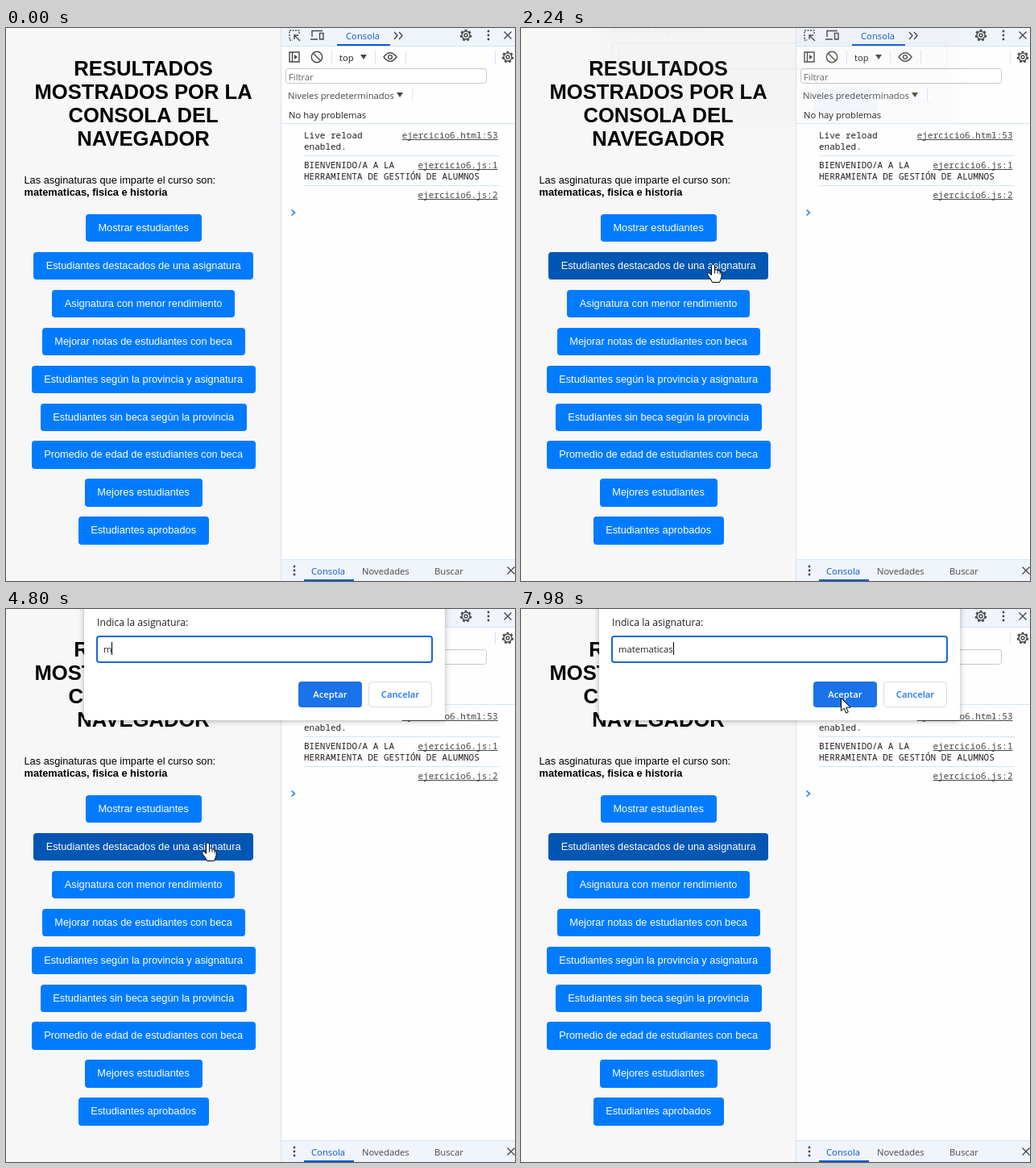
An HTML page with a canvas that plays this animation: 632 px wide and 686 px high, repeating every 8000 ms.

```html
<!DOCTYPE html>
<html lang="es">
<head>
<meta charset="utf-8">
<title>Consola</title>
<style>
html, body { margin: 0; width: 100%; height: 100%; overflow: hidden; background: #fff; }
canvas { display: block; }
</style>
</head>
<body>
<canvas id="stage" width="632" height="686"></canvas>
<script>
const c = document.getElementById('stage').getContext('2d');
const LOOP = 8000;
const SANS = '"Liberation Sans", Arial, sans-serif';
const UI = '"Open Sans", "Noto Sans", sans-serif';
const MONO = '11px "Noto Sans Mono", "DejaVu Sans Mono", monospace';
const BLUE = '#0b57d0', INK = '#1f1f1f', ICON = '#474747', RULE = '#d3e3fd', BAR = '#f0f4fb';

const BUTTONS = [
  'Mostrar estudiantes', 'Estudiantes destacados de una asignatura',
  'Asignatura con menor rendimiento', 'Mejorar notas de estudiantes con beca',
  'Estudiantes según la provincia y asignatura', 'Estudiantes sin beca según la provincia',
  'Promedio de edad de estudiantes con beca', 'Mejores estudiantes', 'Estudiantes aprobados'
];
const WORD = 'matematicas';
const KEY_TIMES = [4800, 4890, 5130, 5180, 5490, 5570, 5710, 5920, 6000, 6090, 6170];
const CARET_TOGGLES = [2710, 3230, 3760, 4390, 6730, 7260];
const HOVER_START = 1370, DIALOG_START = 2240;

// Pointer path: time, x, y
const PATH = [
  [260, 594, 680], [480, 530, 575], [700, 430, 425], [900, 356, 338], [1060, 326, 310],
  [1160, 326, 310], [1370, 307, 303], [1500, 251, 293], [1600, 241, 292], [1690, 238, 292],
  [2710, 238, 292], [2790, 238, 290], [3760, 238, 290], [3990, 250, 289],
  [6880, 250, 289], [7130, 452, 228], [7250, 474, 200], [7450, 446, 162], [7680, 411, 134],
  [7850, 401, 117], [7980, 397, 110]
];

const HAND = new Path2D('M-2 2Q0 -1 2 2V8Q4 6 5.5 8.5Q8 7.5 8.5 10Q10.5 9.5 10.5 12V16Q10 19 8 23H-1Q-2 20 -6 15Q-8 12 -6 11Q-4.5 11 -2 14Z');
const FINGERS = new Path2D('M2 8V12M5.5 9V12M8.5 10.5V13');
const ARROW = new Path2D('M0 0V16L3.7 12.6L6.2 18.5L8.8 17.4L6.3 11.6H11.5Z');
const IBEAM = new Path2D('M-3.5 -7.5H-1L0 -6.5L1 -7.5H3.5M0 -6.5V6.5M-3.5 7.5H-1L0 6.5L1 7.5H3.5');

const clamp = v => Math.max(0, Math.min(1, v));

function text(str, x, y, font, color = INK, align = 'left') {
  c.font = font;
  c.fillStyle = color;
  c.textAlign = align;
  c.fillText(str, x, y);
}
const ui = (str, x, y, color) => text(str, x, y, '11.25px ' + UI, color);

function rect(x, y, w, h, color) {
  c.fillStyle = color;
  c.fillRect(x, y, w, h);
}

function box(x, y, w, h, r, fill, stroke, lineWidth = 1) {
  c.beginPath();
  c.roundRect(x, y, w, h, r);
  if (fill) { c.fillStyle = fill; c.fill(); }
  if (stroke) { c.strokeStyle = stroke; c.lineWidth = lineWidth; c.stroke(); }
}

function line(d, color = ICON, width = 1.4) {
  c.strokeStyle = color;
  c.lineWidth = width;
  c.stroke(new Path2D(d));
}

function fill(d, color = ICON) {
  c.fillStyle = color;
  c.fill(new Path2D(d));
}

function ring(x, y, r, width = 1.4) {
  c.strokeStyle = ICON;
  c.lineWidth = width;
  c.beginPath();
  c.arc(x, y, r, 0, 2 * Math.PI);
  c.stroke();
}

function gear(x, y) {
  c.setLineDash([2.8, 2.8 * 0.964]);
  ring(x, y, 6.3, 2);
  c.setLineDash([]);
  ring(x, y, 5);
  ring(x, y, 2);
}

function kebab(x, y) {
  for (const dy of [-5, 0, 5]) {
    c.fillStyle = ICON;
    c.beginPath();
    c.arc(x, y + dy, 1.4, 0, 2 * Math.PI);
    c.fill();
  }
}

const cross = (x, y) => line(`M${x - 4.5} ${y - 4.5}l9 9m0 -9l-9 9`);

function link(str, y) {
  text(str, 610.5, y, MONO, ICON, 'right');
  const w = c.measureText(str).width;
  rect(610.5 - w, y + 1, w, 1, ICON);
}

function drawPage(t) {
  rect(0, 0, 341, 686, '#f7f7f7');
  ['RESULTADOS', 'MOSTRADOS POR LA', 'CONSOLA DEL', 'NAVEGADOR'].forEach((s, i) =>
    text(s, 170.6, 59 + 29 * i, 'bold 25.6px ' + SANS, '#000', 'center'));
  text('Las asginaturas que imparte el curso son:', 22.5, 193, '12.8px ' + SANS, '#000');
  text('matematicas, fisica e historia', 22.5, 208, 'bold 12.8px ' + SANS, '#000');

  const hover = 1 - (1 - clamp((t - HOVER_START) / 300)) ** 2;
  BUTTONS.forEach((label, i) => {
    const top = Math.round(231 + 46.9 * i), bottom = Math.round(265.4 + 46.9 * i);
    const k = i === 1 ? hover : 0;
    c.font = '12.8px ' + SANS;
    const w = Math.round(c.measureText(label).width + 31.5);
    box(Math.round(170.5 - w / 2), top, w, bottom - top, 4,
      `rgb(0,${Math.round(123 - 37 * k)},${Math.round(255 - 76 * k)})`);
    text(label, 170.6, top + 21, '12.8px ' + SANS, '#fff', 'center');
  });
}

function drawDevtools() {
  rect(341, 0, 291, 686, '#fefefe');
  rect(342, 0, 290, 22, BAR);
  rect(342, 659, 290, 27, BAR);
  for (const y of [22, 118, 659]) rect(342, y, 290, 1, RULE);
  rect(341, 0, 1, 686, '#dbe2ee');

  // Tab strip
  c.setLineDash([2, 1.5]);
  line('M364 7V3H352V15H356');
  c.setLineDash([]);
  line('M365 16L358 9M358 14V9H363');
  line('M380 11V3.5H393M378 14H387M389.5 6.5H394V14H389.5Z');
  ui('Consola', 422, 14, BLUE);
  rect(411, 20, 66, 2, BLUE);
  line('M482 5l4 4.5l-4 4.5M488 5l4 4.5l-4 4.5');
  gear(571, 9);
  kebab(599, 9);
  cross(623, 9);

  // Console toolbar
  line('M352 30H364V42H352ZM355.5 30V42');
  fill('M358 33l4 3l-4 3Z');
  ring(386, 36, 6.7);
  line('M381.5 31.5l9 9');
  for (const x of [404, 458, 496, 607]) rect(x, 28, 1, 16, RULE);
  ui('top', 414, 41);
  fill('M440 33h8l-4 6Z');
  line('M469 36Q477 25.5 485 36Q477 46.5 469 36Z');
  ring(477, 36, 2.4);
  gear(623, 36);

  box(347.5, 50.5, 249, 18, 3, '#fff', '#c7c7c7');
  ui('Filtrar', 351, 65, '#5f6368');
  ui('Niveles predeterminados', 350, 88, ICON);
  fill('M485 80h8l-4 6Z');
  rect(504, 75, 1, 16, RULE);
  ui('No hay problemas', 351, 112);

  // Messages
  text('Live reload', 370, 137, MONO);
  text('enabled.', 370, 151, MONO);
  text('BIENVENIDO/A A LA', 370, 174, MONO);
  text('HERRAMIENTA DE GESTIÓN DE ALUMNOS', 370, 188, MONO);
  link('ejercicio6.html:53', 137);
  link('ejercicio6.js:1', 174);
  link('ejercicio6.js:2', 211);
  for (const y of [158, 195]) rect(370, y, 243, 1, RULE);
  line('M354.5 225.5l4 3.5l-4 3.5', '#1a73e8');

  // Drawer
  kebab(358, 673);
  ui('Consola', 379, 678, BLUE);
  rect(370, 684, 62, 2, BLUE);
  ui('Novedades', 442, 678, ICON);
  ui('Buscar', 532, 678, ICON);
  cross(627, 673);
}

function drawDialog(t) {
  if (t < DIALOG_START) return;
  const shown = clamp(0.04 + (t - DIALOG_START) / 135);
  c.save();
  c.globalAlpha = shown;
  c.translate(0, -16 * (1 - shown));
  c.shadowColor = 'rgba(0,0,0,.3)';
  c.shadowBlur = 7;
  c.shadowOffsetY = 1;
  box(97, -20, 448, 158, 4, '#fff');
  c.shadowColor = 'transparent';

  text('Indica la asignatura:', 113, 21, '12.2px ' + UI);
  box(113, 34, 416, 32, 3, '#fff', '#1967d2', 2);
  const typed = WORD.slice(0, KEY_TIMES.filter(k => t >= k).length);
  ui(typed, 121, 54);
  const caretOn = CARET_TOGGLES.filter(k => t >= k).length % 2 === 0;
  if (caretOn) rect(121 + Math.round(c.measureText(typed).width), 41, 1, 16, '#000');

  box(363, 90, 79, 32, 4, '#1a73e8');
  text('Aceptar', 402.5, 110, '600 11.25px ' + UI, '#fff', 'center');
  box(450.5, 90.5, 78, 31, 4, '#fff', '#dadce0');
  text('Cancelar', 489.5, 110, '600 11.25px ' + UI, '#1a73e8', 'center');
  c.restore();
}

function pointerAt(t) {
  const i = PATH.findIndex(p => p[0] > t);
  if (i < 0) return PATH[PATH.length - 1].slice(1);
  const [t0, x0, y0] = PATH[i - 1], [t1, x1, y1] = PATH[i];
  const k = (t - t0) / (t1 - t0);
  return [x0 + (x1 - x0) * k, y0 + (y1 - y0) * k].map(Math.round);
}

function drawPointer(t) {
  if (t < PATH[0][0]) return;
  const [x, y] = pointerAt(t);
  const overConsole = x > 342 && y > 138 && y < 659;
  const overButton = x >= 34 && x <= 307 && y >= 278 && y <= 312;
  c.save();
  c.translate(x + 0.5, y + 0.5);
  c.strokeStyle = '#000';
  c.lineWidth = 1;
  if (overConsole) {
    c.stroke(IBEAM);
  } else {
    const shape = overButton ? HAND : ARROW;
    c.fillStyle = '#fff';
    c.fill(shape);
    c.stroke(shape);
    if (overButton) c.stroke(FINGERS);
  }
  c.restore();
}

function draw(now) {
  const t = now % LOOP;
  drawPage(t);
  drawDevtools();
  drawDialog(t);
  drawPointer(t);
}

let start;
function tick(now) {
  start ??= now;
  draw(now - start);
  requestAnimationFrame(tick);
}
requestAnimationFrame(tick);
</script>
</body>
</html>
```
